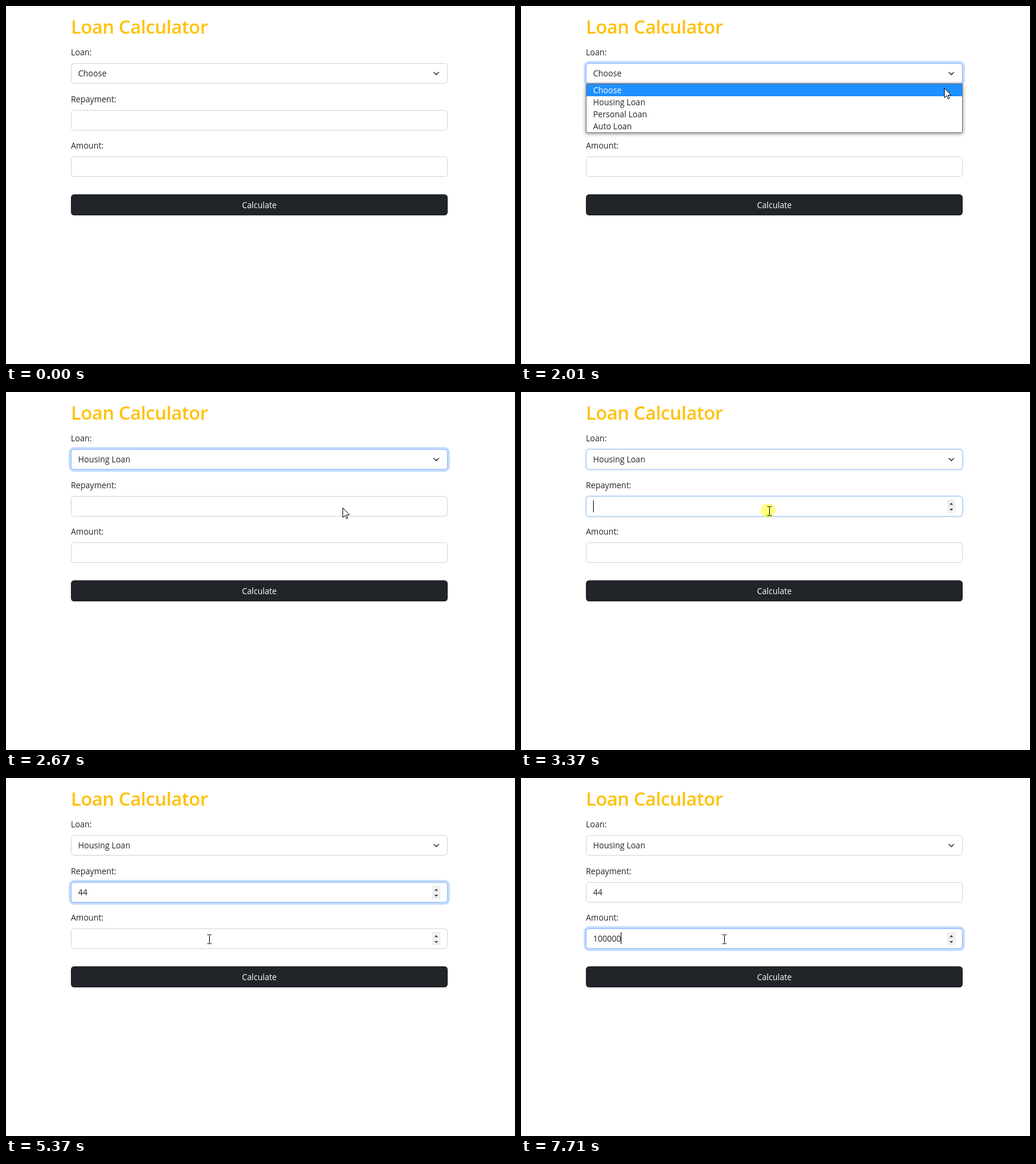
An HTML page that plays this animation: 847x595 px, repeating every 8000 ms.

```html
<!DOCTYPE html>
<html lang="en">
<head>
<meta charset="utf-8">
<title>Loan Calculator</title>
<style>
  html, body { margin: 0; width: 100%; height: 100%; overflow: hidden; background: #fff; }
  svg { display: block; font: 13.55px "Open Sans", "Noto Sans", sans-serif; fill: #212529; }
  .title { font-size: 31px; font-weight: 600; letter-spacing: -.4px; fill: #ffc107; }
  .menu { filter: drop-shadow(0 1px 3px rgba(0, 0, 0, .5)); }
</style>
</head>
<body>
<svg id="stage" width="847" height="595" viewBox="0 0 847 595"></svg>
<script>
const LOOP = 8000;
const stage = document.getElementById('stage');
const options = ['Choose', 'Housing Loan', 'Personal Loan', 'Auto Loan'];

// Timelines: [start in ms, value...]; each value holds until the next start.
const cursor = [
  [0], [330, 'arrow', 607, 287], [660, 'arrow', 644, 231], [1000, 'beam', 666, 199],
  [1340, 'arrow', 709, 144], [1670, 'arrow', 719, 116], [2010, 'arrow', 704, 136],
  [2350, 'arrow', 650, 156], [2670, 'arrow', 560, 192], [3000, 'beam', 410, 190],
  [3690, 'beam', 411, 188], [5030, 'arrow', 376, 233], [5370, 'beam', 335, 260]
];
const loanGlow = [[0, 0], [2010, 1], [3370, .5], [3690, 0]];
const repayGlow = [[0, 0], [3370, .5], [3690, 1], [5700, .05], [6030, 0]];
const amountGlow = [[0, 0], [5700, .95], [6030, 1]];
const repayCaret = [[0, 0], [3370, 1], [4030, 0], [4360, 1], [5030, 0]];
const amountCaret = [[0, 0], [5700, 1]];
const amountDigits = [[0, 0], [6380, 1], [6720, 2], [7050, 3], [7380, 5], [7710, 6]];

const entry = (line, t) => line.findLast(step => step[0] <= t);
const at = (line, t) => entry(line, t)[1];
const within = (t, from, to) => t >= from && t < to;

const text = (s, x, y, extra = '') => `<text x="${x}" y="${y}" ${extra}>${s}</text>`;
const rect = (x, y, w, h, fill, extra = '') =>
  `<rect x="${x}" y="${y}" width="${w}" height="${h}" fill="${fill}" ${extra}/>`;

function field(y, glow, value) {
  const s = 3.6 * glow;
  const border = `color-mix(in srgb, #86b7fe ${glow * 100}%, #ced4da)`;
  return (glow ? rect(108 - s, y - s, 627 + 2 * s, 34 + 2 * s,
      `rgba(13,110,253,${.25 * glow})`, `rx="${5.4 + s}"`) : '') +
    rect(108.5, y + .5, 626, 33, '#fff', `rx="4.9" style="stroke:${border}"`) +
    text(value, 120, y + 22);
}

function numberField(y, glow, value, caret, spinner) {
  let out = field(y, glow, value);
  if (spinner) {
    out += rect(709, y + 6, 14, 22, '#f0f0f0') +
      `<path fill="#444" d="M713 ${y + 14.5}l3-3.5 3 3.5zM713 ${y + 21}l3 3.5 3-3.5z"/>`;
  }
  if (caret) {
    const n = value.length;
    out += rect(Math.floor(120 + 7.76 * n), y + (n ? 6 : 7), 1, 20, '#000');
  }
  return out;
}

function menu(active) {
  const rows = options.map((name, i) => {
    const on = i === active;
    return (on ? rect(109, 130 + 20 * i, 625, 20, '#1e90ff') : '') +
      text(name, 120, 145 + 20 * i, on ? 'fill="#fff"' : '');
  });
  return `<g class="menu">${rect(108.5, 129.5, 626, 81, '#fff', 'stroke="#767676"')}</g>` + rows.join('');
}

function pointer([, kind, x, y]) {
  if (!kind) return '';
  const shape = kind === 'arrow'
    ? '<path d="M.5.5V16.5L4.2 13 6.6 18.4 8.9 17.4 6.6 12.2H11.6Z" fill="#fff" stroke="#000"/>'
    : '<path d="M0 .5H3M4 .5H7M3.5 1V15M0 15.5H3M4 15.5H7" fill="none" stroke="#000"/>';
  return `<g transform="translate(${x} ${y})">${shape}</g>`;
}

function scene(t) {
  const repaid = t >= 4360 ? '44' : '';
  const amount = '100000'.slice(0, at(amountDigits, t));
  return text('Loan Calculator', 108, 46, 'class="title"') +
    text('Loan:', 108, 82) + text('Repayment:', 108, 160) + text('Amount:', 108, 237) +
    field(95, at(loanGlow, t), options[t >= 2670 ? 1 : 0]) +
    '<path d="M712 110.2l4 4 4-4" fill="none" stroke="#212529" stroke-width="1.4" stroke-linecap="round" stroke-linejoin="round"/>' +
    numberField(173, at(repayGlow, t), repaid, at(repayCaret, t),
      within(t, 1000, 1340) || within(t, 3000, 5700)) +
    numberField(250, at(amountGlow, t), amount, at(amountCaret, t), t >= 5370) +
    rect(108, 313, 627, 35, '#212529', 'rx="5.4"') +
    text('Calculate', 421.5, 336, 'text-anchor="middle" fill="#fff"') +
    (within(t, 2010, 2670) ? menu(t < 2350 ? 0 : 1) : '') +
    (within(t, 3370, 3690) ? '<circle cx="411" cy="197" r="12" fill="#ff0" fill-opacity=".5"/>' : '') +
    pointer(entry(cursor, t));
}

let shown;
function frame() {
  const next = scene(performance.now() % LOOP);
  if (next !== shown) stage.innerHTML = shown = next;
  requestAnimationFrame(frame);
}
frame();
</script>
</body>
</html>
```
